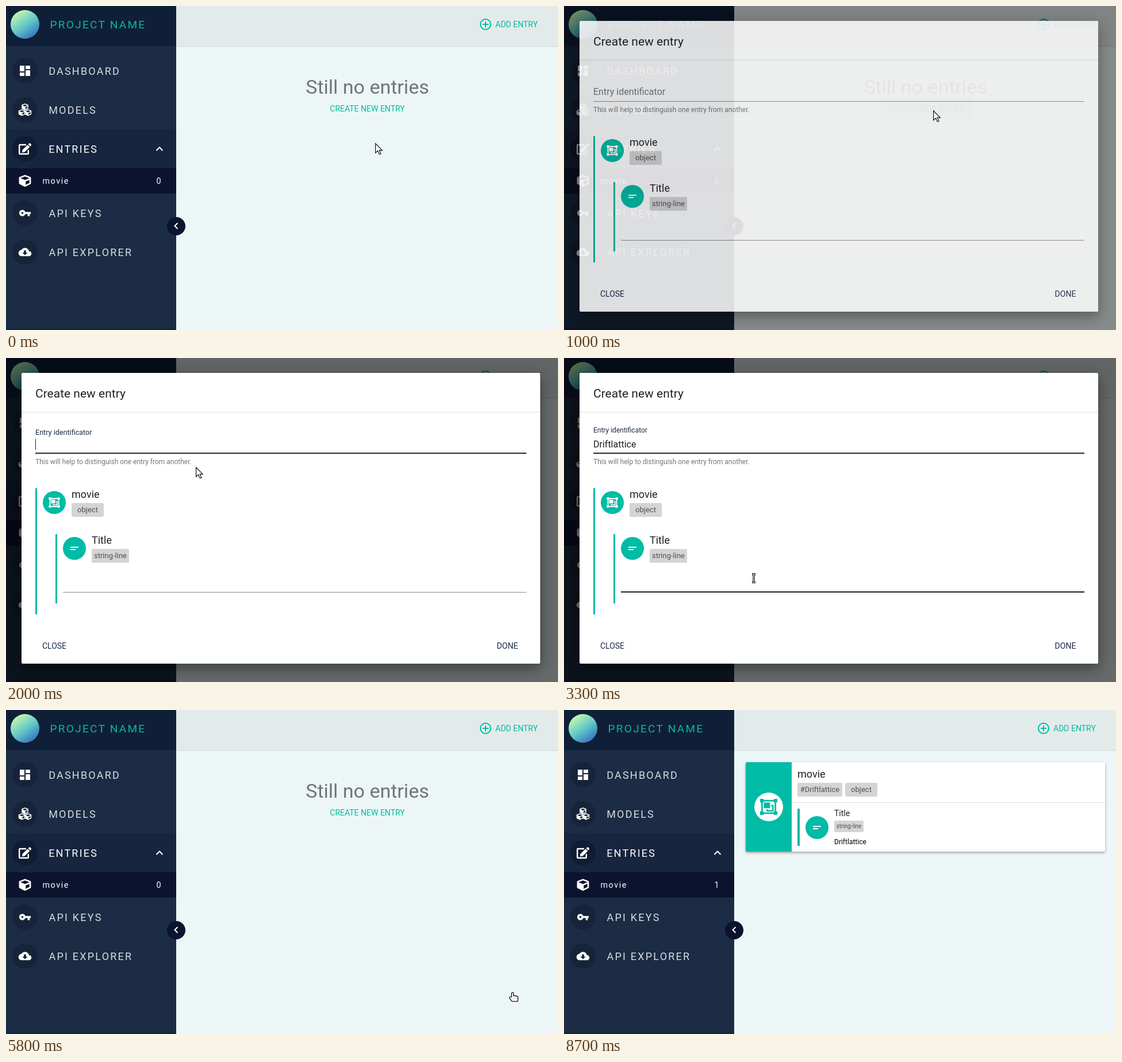
An HTML page for the animation above (9 s loop, 960x565 px).

```html
<!DOCTYPE html>
<html lang="en">
<head>
<meta charset="utf-8">
<title>Create an entry</title>
<style>
html, body { margin: 0; width: 100%; height: 100%; overflow: hidden; background: #edf6f7; }
svg { display: block; font-family: Roboto, sans-serif; font-size: 14px; }
.teal { fill: #00bba5; color: #00bba5; }
.nav { font-size: 18px; letter-spacing: 2.2px; fill: #d9dde2; }
.sub { font-size: 14.4px; letter-spacing: 1.5px; fill: #fff; }
.dot { fill: #16243a; }
.icon { fill: #fff; color: #fff; }
.stroke { fill: none; stroke: #fff; stroke-width: 2; }
.mid { text-anchor: middle; }
.chip { fill: #d4d4d4; }
.chipText { font-size: 13px; fill: #505050; text-anchor: middle; }
.head { font-size: 18px; fill: #212121; }
.value { font-size: 16px; fill: #212121; }
.navy { fill: #1b2a47; }
.sheet { fill: #fff; filter: drop-shadow(0 8px 12px rgba(0,0,0,.4)); }
.card { fill: #fff; filter: drop-shadow(0 2px 2px rgba(0,0,0,.35)); }
</style>
</head>
<body>
<svg width="960" height="565" viewBox="0 0 960 565">
  <defs>
    <linearGradient id="sky" x1=".2" y1=".1" x2=".8" y2=".95">
      <stop offset="0" stop-color="#c4f5ae"/>
      <stop offset=".5" stop-color="#62c9c6"/>
      <stop offset="1" stop-color="#3572c4"/>
    </linearGradient>
    <clipPath id="buttonClip"><rect x="547" y="161" width="163" height="36" rx="2"/></clipPath>
    <path id="cube" transform="scale(.0391) translate(-256 -256)" d="M239 6l-208 78q-31 12-31 45v225q0 29 27 43l208 104q21 10 42 0l208-104q27-14 27-43V129q0-33-31-45L273 6q-17-6-34 0zM256 68l192 73-192 78-192-78zm32 356V275l160-65v134z"/>
    <g id="group">
      <path d="M-7.5 -7h15v14h-15z" fill="none" stroke="currentColor" stroke-width="1.8"/>
      <path d="M-9.7 -9h4v4h-4zM5.7 -9h4v4h-4zM-9.7 5h4v4h-4zM5.7 5h4v4h-4zM-5.5 -5h7v6.5h-7z" fill="currentColor"/>
      <path d="M2.5 -1.5h2.2v5.8h-6.4v-1.8" fill="none" stroke="currentColor" stroke-width="1.6"/>
    </g>
    <path id="lines" d="M-7 -3h14v2h-14zM-7 1h9v2h-9z" fill="#fff"/>
    <path id="arrow" d="M.6 .8V17.2l3.9-3.6 2.9 6.2 2.6-1.2-2.8-6h5z" fill="#fff" stroke="#111" stroke-width="1.2"/>
    <g id="beam" fill="none">
      <path d="M-3 -7h6M-3 7h6M0 -7V7" stroke="#111" stroke-width="3.4"/>
      <path d="M-2.5 -7h5M-2.5 7h5M0 -7V7" stroke="#fff" stroke-width="1.1"/>
    </g>
    <g id="hand">
      <path d="M-1.6 8V2a1.6 1.6 0 0 1 3.2 0V6l6 1q1.9.4 1.8 2.4l-.4 6.8H-1l-4.3-5.6q-.9-1.9 1-1.9z" fill="#fff" stroke="#111" stroke-width="1.3" stroke-linejoin="round"/>
      <path d="M1 11h1M4 11h1M7 11h1" stroke="#777"/>
    </g>
  </defs>

  <rect width="960" height="565" fill="#edf6f7"/>
  <rect width="960" height="70" fill="#e3ebea"/>
  <rect y="70" width="960" height="1" fill="#cfd8d8"/>
  <g fill="none" stroke="#00bba5" stroke-width="2">
    <circle cx="834" cy="32" r="9"/><path d="M829 32h10M834 27v10"/>
  </g>
  <text class="teal" x="851" y="37">ADD ENTRY</text>

  <g id="empty">
    <text class="mid" x="628.5" y="153" font-size="34" fill="#727575">Still no entries</text>
    <g clip-path="url(#buttonClip)" class="teal">
      <rect id="hover" x="547" y="161" width="163" height="36"/>
      <circle id="ripple" cx="640" cy="182" fill-opacity=".16"/>
    </g>
    <text class="teal mid" x="628.5" y="184">CREATE NEW ENTRY</text>
  </g>

  <g id="entry">
    <rect class="card" x="316" y="91" width="625" height="156" rx="2"/>
    <path class="teal" d="M396 91h-78q-2 0-2 2v152q0 2 2 2h78z"/>
    <circle cx="356" cy="169" r="25" fill="#fff"/>
    <use class="teal" href="#group" transform="translate(356 169) scale(1.55)"/>
    <text class="head" x="406" y="118">movie</text>
    <rect class="chip" x="406" y="127" width="78" height="24" rx="2"/>
    <text class="chipText" x="445" y="143">#Driftlattice</text>
    <rect class="chip" x="489" y="127" width="56" height="24" rx="2"/>
    <text class="chipText" x="517" y="143">object</text>
    <rect x="396" y="161" width="545" height="1" fill="#dcdcdc"/>
    <rect class="teal" x="406" y="172" width="4" height="65"/>
    <circle class="teal" cx="440" cy="205" r="20"/>
    <use href="#lines" x="440" y="205"/>
    <text x="470" y="185" fill="#212121">Title</text>
    <rect class="chip" x="470" y="193" width="51" height="20" rx="2"/>
    <text class="chipText" x="495.5" y="206" style="font-size:10px">string-line</text>
    <text x="470" y="234" font-size="12">Driftlattice</text>
  </g>

  <rect width="296" height="565" fill="#1b2c44"/>
  <rect width="296" height="70" fill="#101f38"/>
  <rect y="215" width="296" height="68" fill="#17263f"/>
  <rect y="283" width="296" height="44" fill="#0c132e"/>
  <rect y="561" width="296" height="4" fill="#17263f"/>
  <circle cx="33" cy="32" r="25" fill="url(#sky)"/>
  <text class="teal" x="76.5" y="39" font-size="19" letter-spacing="2.3">PROJECT NAME</text>
  <g class="dot">
    <circle cx="33" cy="113" r="22"/><circle cx="33" cy="181" r="22"/>
    <circle cx="33" cy="249" r="22" fill="#101c33"/>
    <circle cx="33" cy="361" r="22"/><circle cx="33" cy="429" r="22"/>
  </g>
  <g class="nav">
    <text x="74.2" y="120">DASHBOARD</text>
    <text x="74.2" y="188">MODELS</text>
    <text x="74.2" y="256" fill="#fff" style="fill:#fff">ENTRIES</text>
    <text x="74.6" y="368">API KEYS</text>
    <text x="74.6" y="436">API EXPLORER</text>
  </g>
  <text class="sub" x="63.5" y="310">movie</text>
  <text class="sub" id="count" x="261.5" y="310">0</text>
  <g class="icon">
    <path transform="translate(21 101)" d="M13 3v6h8V3zM13 21h8V11h-8zM3 21h8v-6H3zM3 13h8V3H3z"/>
    <use href="#cube" transform="translate(33 176) scale(.58)"/>
    <use href="#cube" transform="translate(27.6 186) scale(.58)"/>
    <use href="#cube" transform="translate(38.4 186) scale(.58)"/>
    <use href="#cube" transform="translate(33 305) scale(1.04)"/>
    <path d="M35 242H24.2q-1 0-1 1v14q0 1 1 1H37.800q1 0 1-1v-6" fill="none" stroke="#fff" stroke-width="2.4"/>
    <path d="M37.500 242.200l3.800 3.800-9 8.800-4.300.6.5-4.300zM38.500 241.200l1.500-1.500q1.200-1.200 2.400 0l1.200 1.200q1.200 1.200 0 2.400l-1.500 1.500z"/>
    <path transform="translate(33 361) scale(.92) translate(-12 -12)" d="M12.650 10C11.830 7.670 9.600 6 7 6a6 6 0 0 0 0 12c2.600 0 4.800-1.670 5.650-4H17v4h4v-4h2v-4zM7 14a2 2 0 0 1 0-4 2 2 0 0 1 0 4z"/>
    <path transform="translate(33 429) scale(.92) translate(-12 -12)" d="M19.350 10C18.700 6.600 15.600 4 12 4 9.100 4 6.600 5.600 5.350 8A6 6 0 0 0 6 20h13a5 5 0 0 0 .350-10zM17 13l-5 5-5-5h3V9h4v4z"/>
  </g>
  <path class="stroke" d="M261.500 252l5.500-5.500 5.500 5.500"/>
  <circle cx="296" cy="384" r="16" fill="#0c132e"/>
  <path class="stroke" d="M298.500 378.500l-5 5 5 5"/>

  <rect id="shade" width="960" height="565"/>

  <g id="dialog">
    <rect class="sheet" x="27" y="26" width="902" height="507" rx="2"/>
    <text x="51" y="69" font-size="21" fill="#212121">Create new entry</text>
    <rect x="27" y="94" width="902" height="1" fill="#dcdcdc"/>
    <text id="label" x="51">Entry identificator</text>
    <text class="value" id="name" x="51" y="156">Driftlattice</text>
    <rect id="line1" x="51" width="854"/>
    <text x="51" y="185" font-size="12" fill="#757575">This will help to distinguish one entry from another.</text>
    <rect class="teal" x="51" y="227" width="3" height="220"/>
    <circle class="teal" cx="84" cy="252" r="20"/>
    <use class="icon" href="#group" x="84" y="252"/>
    <text class="head" x="114" y="244">movie</text>
    <rect class="chip" x="114" y="253" width="56" height="24" rx="2"/>
    <text class="chipText" x="142" y="269">object</text>
    <rect class="teal" x="86" y="307" width="3" height="121"/>
    <circle class="teal" cx="119" cy="332" r="20"/>
    <use href="#lines" x="119" y="332"/>
    <text class="head" x="149" y="324">Title</text>
    <rect class="chip" x="149" y="333" width="65" height="24" rx="2"/>
    <text class="chipText" x="181.500" y="349">string-line</text>
    <text class="value" id="title" x="99" y="398">Driftlattice</text>
    <rect id="line2" x="99" width="806"/>
    <rect id="caret" width="1" height="19" fill="#212121"/>
    <rect id="doneHover" x="828" y="484" width="88" height="36" rx="2" fill="#dfdfdf"/>
    <text class="navy mid" x="84" y="507">CLOSE</text>
    <text class="navy mid" x="872" y="507">DONE</text>
  </g>

  <use id="cursor"/>
</svg>

<script>
const LOOP = 9000, TICK = 100;
const $ = id => document.getElementById(id);
const set = (id, attrs) => {
  for (const key in attrs) $(id).setAttribute(key, attrs[key]);
};
const show = (id, on) => set(id, { visibility: on ? "visible" : "hidden" });
const mix = (a, b, k) => a + (b - a) * k;

// Each track row: start time, then the values held from there on.
const tracks = {
  cursor: [
    [0, "arrow", 642, 239], [100, "arrow", 642, 232], [200, "arrow", 642, 213],
    [300, "hand", 642, 192], [400, "hand", 642, 184], [500, "hand", 642, 182],
    [1000, "arrow", 642, 182], [1200, "arrow", 632, 180], [1300, "arrow", 590, 172],
    [1400, "beam", 510, 160], [1500, "beam", 420, 154], [1600, "beam", 355, 152],
    [1700, "beam", 330, 152], [2000, "arrow", 330, 190], [2100, "arrow", 330, 229],
    [3300, "beam", 330, 384], [3400, "beam", 330, 388],
    [4900, "arrow", 700, 470], [5000, "hand", 881, 492], [6400, "arrow", 880, 493],
    [7000, "arrow", 852, 438], [7200, "arrow", 778, 301], [7400, "arrow", 565, 134],
    [7500, "arrow", 697, 192], [7700, "arrow", 693, 184], [8400, "arrow", 535, 147],
    [8600, "arrow", 178, 0], [8700, "none", 0, 0]
  ],
  hover: [[0, 0], [300, .03], [400, .07], [500, .1], [5800, 0]],
  ripple: [[0, 0], [900, 36], [1000, 72], [1100, 0]],
  shade: [[0, 0], [900, .2], [1000, .44], [1100, .57], [5800, 0]],
  dialog: [[0, 0], [900, .3], [1000, .86], [1100, 1], [5800, 0]],
  float: [[0, 0], [1900, .4], [2000, .85], [2100, 1]],
  label: [[0, "#757575"], [1900, "#1b2a47"], [3600, "#757575"]],
  line1: [[0, "idle"], [1500, "over"], [1900, "focus"], [3800, "idle"]],
  line2: [[0, "idle"], [3300, "over"], [3800, "focus"]],
  caret: [[0, 0, 0], [2000, 51, 141], [2400, 0, 0], [3600, 99, 383], [4000, 174, 383], [4900, 0, 0]]
};
const at = (name, t) => tracks[name].findLast(row => row[0] <= t).slice(1);

const lineLooks = {
  idle: ["#8c8c8c", 1, 0],
  over: ["#212121", 2, -1],
  focus: ["#1b2a47", 2, -1]
};

function drawLine(id, t, y) {
  const [fill, height, dy] = lineLooks[at(id, t)[0]];
  set(id, { fill, height, y: y + dy });
}

function draw(t) {
  const [kind, x, y] = at("cursor", t);
  show("cursor", kind !== "none");
  set("cursor", { href: "#" + kind, x, y });

  set("hover", { opacity: at("hover", t)[0] });
  set("ripple", { r: at("ripple", t)[0] });
  set("shade", { opacity: at("shade", t)[0] });
  set("dialog", { opacity: at("dialog", t)[0] });

  const k = at("float", t)[0];
  set("label", { y: mix(155, 130, k), "font-size": mix(16, 12, k), fill: at("label", t)[0] });
  drawLine("line1", t, 166);
  drawLine("line2", t, 408);

  const [cx, cy] = at("caret", t);
  show("caret", cx > 0);
  set("caret", { x: cx, y: cy });

  show("name", t >= 3300);
  show("title", t >= 4000);
  show("doneHover", t >= 5000);

  const saved = t >= 6400;
  show("empty", !saved);
  show("entry", saved);
  $("count").textContent = saved ? "1" : "0";
}

const start = performance.now();
function frame() {
  const t = (performance.now() - start) % LOOP;
  draw(Math.floor(t / TICK) * TICK);
  requestAnimationFrame(frame);
}
frame();
</script>
</body>
</html>
```
